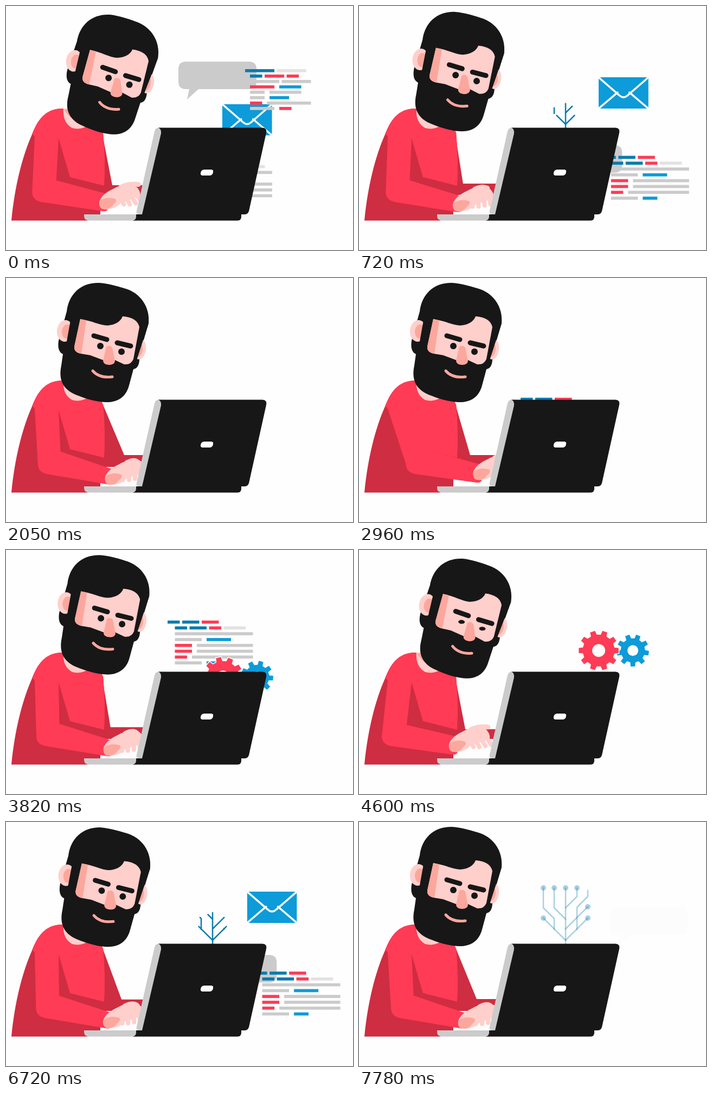
Write an HTML page with a canvas that moves like this. It is 640 by 452 pixels and loops after 7.85 s.

```html
<!DOCTYPE html>
<html lang="en">
<head>
<meta charset="utf-8">
<title>Typing at a laptop</title>
<style>
html, body { margin: 0; width: 100%; height: 100%; overflow: hidden; background: #fefefe; }
canvas { display: block; }
</style>
</head>
<body>
<canvas id="stage" width="640" height="452"></canvas>
<script>
const g = document.getElementById('stage').getContext('2d');
const LOOP = 7850, SHIFT = 5900, TYPE = 155, TAU = 2 * Math.PI;
const BLACK = '#171717', RED = '#ff3b55', DARK = '#cf2d41', SKIN = '#ffcfcb', BLUSH = '#fca79d',
  GREY = '#cbcbcb', BLUE = '#0d9bd9', NAVY = '#0b7bae', WHITE = '#fefefe';
const INK = { d: NAVY, b: BLUE, r: RED, g: GREY, e: '#e2e2e2' };

// Words of code: colour letter and length; slashes part the lines
const PAGE_A = 'd12 e12/d5 r8 r5/g12 g12/r10 b9/g6 g13/g6 b8/r5 g18/g10 r5';
const PAGE_B = 'd5 d7 r7/d5 d7 r5 e9/g32/g11 b10/r7 g23/r7 g23/r5 g25/g11 b6';

const clamp = v => Math.max(0, Math.min(1, v));
const ramp = (t, a, b) => clamp((t - a) / (b - a));
const smooth = (t, a, b) => { const p = ramp(t, a, b); return p * p * (3 - 2 * p); };
const easeOut = (t, start, time, power) => 1 - (1 - ramp(t, start, start + time)) ** power;

function fill(color, d) {
  g.fillStyle = color;
  g.fill(new Path2D(d));
}
function line(color, width, d) {
  g.strokeStyle = color;
  g.lineWidth = width;
  g.lineCap = g.lineJoin = 'round';
  g.stroke(new Path2D(d));
}
function oval(color, x, y, rx, ry, turn = 0) {
  g.fillStyle = color;
  g.beginPath();
  g.ellipse(x, y, rx, ry, turn, 0, TAU);
  g.fill();
}

// Slides a drawing from one point to another, then fades it out
function slide(t, start, time, [x0, y0], [x1, y1], fade, draw, power = 3) {
  if (t < start || t > fade + 250) return;
  const p = easeOut(t, start, time, power);
  g.save();
  g.globalAlpha = 1 - ramp(t, fade, fade + 250);
  g.translate(x0 + (x1 - x0) * p, y0 + (y1 - y0) * p);
  draw();
  g.restore();
}

function code(page, indent, pitch) {
  const unit = 4.5;
  page.split('/').forEach((row, i) => {
    let x = i ? indent * unit : 0;
    for (const word of row.split(' ')) {
      const w = word.slice(1) * unit;
      g.fillStyle = INK[word[0]];
      g.fillRect(x, i * pitch, w, 5.7);
      x += w + (i < 3 ? unit : 2 * unit);
    }
  });
}

function bubble() {
  fill(GREY, 'M14 0H130Q144 0 144 14V37Q144 51 130 51H37L16 70L20 51H14Q0 51 0 37V14Q0 0 14 0Z');
}

function mail() {
  const box = 'M0 0H92V58H0Z';
  g.clip(new Path2D(box));
  fill(BLUE, box);
  line(WHITE, 3.5, 'M0 0L39 34Q46 40 53 34L92 0M0 58L35 28M92 58L57 28');
}

function gear(color, x, teeth, r, hole, turn) {
  g.beginPath();
  for (let i = 0; i < teeth * 4; i++) {
    const out = i % 4 == 1 || i % 4 == 2, side = i % 4 < 2 ? -1 : 1;
    const a = turn + ((i >> 2) + side * (out ? .2 : .3)) * TAU / teeth, rad = out ? r : r - 7.5;
    g.lineTo(x + rad * Math.cos(a), rad * Math.sin(a));
  }
  g.closePath();
  g.strokeStyle = WHITE;
  g.lineWidth = 3;
  g.stroke();
  g.fillStyle = color;
  g.fill();
  oval(WHITE, x, 0, hole, hole);
}

// A twig rises, runs outwards on the diagonal, rises to its top and ends in a dot
function twig(grown, start, side, x, y, bend, reach, top) {
  const parts = [[0, bend - y], [reach - x, reach - x], [0, top - bend - reach + x]];
  let left = grown - start, d = `M${side * x} ${-y}`;
  if (left <= 0) return;
  for (const [dx, dy] of parts) {
    const len = Math.hypot(dx, dy), k = len && clamp(left / len);
    x += dx * k;
    y += dy * k;
    left -= len;
    d += `L${side * x} ${-y}`;
  }
  line(NAVY, 2.5, d);
  const dot = 5 * clamp(Math.min(left, grown - 106) / 12);
  oval(NAVY, side * x, -y, dot, dot);
}

function tree(t) {
  const grown = 140 * easeOut(t, 6310, 1751, 2);
  g.save();
  g.globalAlpha = 1 - ramp(t, 7650, 7850);
  g.translate(381, 226);
  twig(grown, 0, 1, 0, 0, 0, 0, 104);
  twig(grown, 28, 1, 0, 28, 28, 41, 69);
  for (const side of [-1, 1]) {
    const late = side > 0 ? 21 : 0;
    twig(grown, 22, side, 0, 7, 7, 41, 48);
    twig(grown, 46 + late, side, 0, 46 + late, 46 + late, 21, 104);
    twig(grown, 35 + late, side, 21, 27, 47 + late, 41, 104);
  }
  g.restore();
}

function gears(t) {
  const turn = (t - 4600) * .0015;
  gear(BLUE, 63, 9, 30, 10, TAU / 4 - turn * 10 / 9);
  gear(RED, 0, 10, 37, 12, turn);
}

function props(t) {
  const pageA = () => code(PAGE_A, 2, 10), pageB = () => code(PAGE_B, 3, 10.8);
  slide(t, 2930, 1100, [298, 230], [298, 130], 3950, pageB);
  slide(t, 3495, 2745, [372, 268], [461, 164], 5000, () => gears(t));
  slide(t, 5220, 1140, [318, 230], [318, 94], 6250, bubble);
  slide(t, 6352, 2362, [300, 292], [492, 133], 7540, bubble, 2);
  slide(t, 5530, 2036, [355, 232], [451.5, 121], 7100, mail);
  slide(t, 5055, 1442, [323, 235], [450, 108], 6200, pageA);
  slide(t, 5698, 1920, [275, 287], [480, 276], 7175, pageB);
  tree(t);
}

function laptop() {
  fill(GREY, 'M144 386H242V397.5H153Q144 397 144 389Z');
  fill(BLACK, 'M240 386H434V390Q434 397.5 427 397.5H234Q240 396 240 390Z');
  fill(GREY, 'M281 225.5H290V240L254 386H246Q239 386 241 379L274 232Q276 225.5 281 225.5Z');
  fill(BLACK, 'M281 225.5H473Q482 226 480 235L448 380Q446 386 440 386H251L286 236Q287 228 281 225.5Z');
  fill('#fff', 'M366 303H378Q383 303 382 308Q381 314 375 314H363Q358 314 359 309Q360 303 366 303Z');
}

function hand(lean) {
  fill(SKIN, 'M166 360Q170 346 192 336Q212 324 232 330Q243 340 241 350L206 362Q198 372 182 374Q164 376 166 360Z');
  line(SKIN, 9, `M206 333Q220 326 ${238 - 12 * lean} ${328 + 4 * lean}`);
  for (let i = 0; i < 4; i++) {
    line(SKIN, 8, `M${202 + 10 * i} ${346 - i}L${211 + 11 * i - 12 * lean} ${365 - 2 * Math.max(0, i - 1)}`);
  }
  fill(BLUSH, 'M167 358Q180 350 196 355Q199 360 192 365Q187 374 174 374Q164 373 167 358Z');
}

// s moves the near arm to the right, dy lowers its hand
function body(s, dy, farX, lean) {
  const farY = 332 - 4 * lean, wrist = 182 + s;
  fill(DARK, `M176 228L${farX} ${farY}L253 ${farY}V350H170Z`);
  fill(DARK, 'M10 397.5C16 335 30 278 48 238C58 212 72 190 104 190L179 234L186 334L174 350V386L150 397.5Z');
  fill(RED, 'M48 238C58 212 72 190 104 190L160 200L179 234Q184 285 181 333L118 317L97 245Z');
  fill(SKIN, 'M106 190Q104 216 122 226Q140 231 156 218L150 190Z');
  fill(BLUSH, 'M118 190L152 217Q120 215 107 192Z');
  fill(RED, `M48 236L53 242L${42 + s} 345Q${42 + s} 359 ${58 + s} 363L${172 + s} ${379 + dy * .4}
    Q${wrist} ${380 + dy * .4} ${wrist} ${372 + dy}V${346 + dy}L${88 + .75 * s} ${324 - .15 * s}L97 245Z`);
  g.save();
  g.translate(s, dy);
  hand(lean);
  g.restore();
}

function head(k, lid) {
  g.save();
  g.translate(180 + 15.5 * k, 120 + 7.5 * k);
  g.rotate(.055 * k);
  g.translate(-180, -120);
  fill(BLACK, `M97 116L112 62C116 28 140 8 172 9C186 10 202 14 218 19C248 27 266 54 263 84L253 118L246 152
    Q245 167 235 169L227 199C221 222 204 231 183 230C165 229 148 224 128 216C103 205 97 186 102 162L105 141Q94 136 97 116Z`);
  oval(SKIN, 109, 98, 15, 20, .1);
  oval(BLUSH, 112, 99, 9, 13, .1);
  oval(SKIN, 247, 132, 11, 19, .15);
  oval(BLUSH, 245, 133, 7, 13, .15);
  fill(BLACK, 'M119 78L140 74L128 125L135 145L108 140Z');
  fill(BLACK, 'M245 85L263 84L241 152L229 156Z');
  fill(SKIN, `M137 76C158 79 174 88 187 88C202 87 212 80 215 71Q242 73 246 91L235 150Q231 161 218 160
    L201 152H179L155 143L137 140Q125 137 126 127Z`);
  fill(BLUSH, 'M137 76L148 79L139 140Q125 138 126 127Z');
  fill(BLUSH, 'M185 127Q192 123 196 129L201 154Q200 161 190 161Q179 160 179 153Z');
  line(BLUSH, 5, 'M160 172Q172 186 196 183');
  line(BLACK, 9, 'M162 107L186 114M205 120L230 126');
  oval(BLACK, 174, 126, 6, 6 * lid);
  oval(BLACK, 213, 136.5, 6, 6 * lid);
  g.restore();
}

function draw(now) {
  const ms = now % LOOP;
  const t = ms < 1950 ? ms + SHIFT : ms;
  // lean is 1 when the head is back, reach is the long stretch of the arm
  const lean = t >= 5000 ? smooth(t, 5900, 7000) : 1 - smooth(t, 3700, 4430);
  const reach = smooth(t, 2150, 2800) - smooth(t, 3300, 4000);
  const phase = (t - 5840) / TYPE * TAU;
  const tap = 3.5 - 3.5 * Math.cos(phase);
  const farX = 196 + lean * (8 - 14.5 * Math.cos(phase - .6)) - 6 * reach;
  const blink = Math.min(Math.abs(t - 7220), Math.abs(t - 4530)) / 120;

  g.fillStyle = WHITE;
  g.fillRect(0, 0, 640, 452);
  props(t);
  body(10 * lean + 28 * reach + tap, 9 * lean * (1 - reach) + tap * .4 * (1 - lean), farX, lean);
  head(1 - lean, Math.max(.12, clamp(blink)));
  laptop();
}

const begin = performance.now();
function tick() {
  draw(performance.now() - begin);
  requestAnimationFrame(tick);
}
tick();
</script>
</body>
</html>
```
